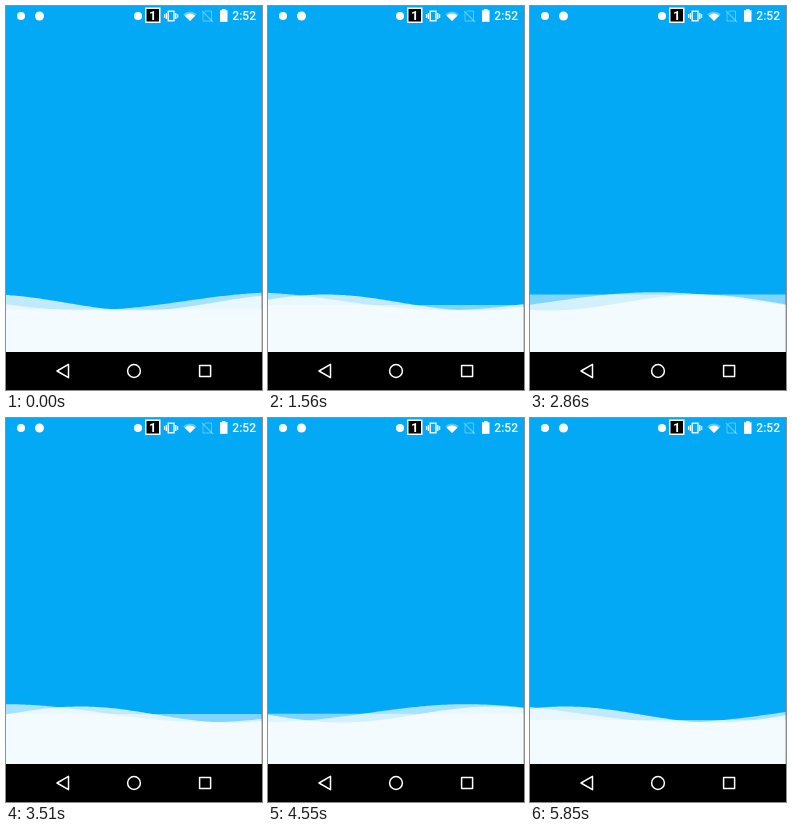
An HTML page with a canvas for the animation above (5.98 s loop, 256x384 px).

```html
<!DOCTYPE html>
<html>
<head>
<meta charset="utf-8">
<style>
  html, body { margin: 0; width: 100%; height: 100%; overflow: hidden; background: #000; }
  canvas { display: block; }
</style>
</head>
<body>
<canvas id="stage" width="256" height="384"></canvas>
<script>
const ctx = document.getElementById('stage').getContext('2d');
const W = 256, H = 384, NAV_TOP = 346;
const STEP = 130, LOOP = 5980, WAVE_PERIOD = 2070;
const START_PHASE = 20 * Math.PI / 180;
const SKY = '#03a9f5';

function shape(points, close = true) {
  ctx.beginPath();
  points.forEach(([x, y]) => ctx.lineTo(x, y));
  if (close) ctx.closePath();
}

function dot(x, y, r) {
  ctx.beginPath();
  ctx.arc(x, y, r, 0, 2 * Math.PI);
}

// Translucent white water below the curve y = height(x)
function water(alpha, height) {
  const right = 255.4;
  ctx.beginPath();
  ctx.moveTo(0, NAV_TOP);
  for (let x = 0; x < right; x += 2) ctx.lineTo(x, height(x));
  ctx.lineTo(right, height(right));
  ctx.lineTo(right, NAV_TOP);
  ctx.fillStyle = `rgba(255,255,255,${alpha})`;
  ctx.fill();
}

function wedge(x, y, r) {
  ctx.beginPath();
  ctx.moveTo(x, y);
  ctx.arc(x, y, r, -Math.PI * 0.75, -Math.PI * 0.25);
  ctx.closePath();
  ctx.fill();
}

function statusBar() {
  ctx.fillStyle = ctx.strokeStyle = '#fff';
  for (const [x, r] of [[15, 4], [33.5, 4.5], [132, 4]]) {
    dot(x, 10, r);
    ctx.fill();
  }

  // Boxed digit
  ctx.fillRect(139, 1.5, 15.5, 15.5);
  ctx.fillStyle = '#000';
  ctx.fillRect(140.5, 3, 12.5, 12.5);
  ctx.fillStyle = '#fff';
  ctx.font = 'bold 13px Roboto, sans-serif';
  ctx.textAlign = 'center';
  ctx.fillText('1', 146.7, 14);

  // Vibrate
  ctx.lineWidth = 1.3;
  ctx.strokeRect(162.2, 5.2, 5.8, 9.6);
  for (const side of [-1, 1]) {
    for (const [offset, half] of [[4.7, 3], [6.5, 1.8]]) {
      const x = 165.1 + side * offset;
      shape([[x, 10 - half], [x, 10 + half]], false);
      ctx.stroke();
    }
  }

  // Wi-Fi
  ctx.globalAlpha = 0.35;
  wedge(184, 15, 9.5);
  ctx.globalAlpha = 1;
  wedge(184, 15, 7.5);

  // Missing SIM
  ctx.globalAlpha = 0.35;
  shape([[199.5, 5], [205.5, 5], [205.5, 15], [197, 15], [197, 7.5]]);
  ctx.lineWidth = 1;
  ctx.stroke();
  shape([[196, 5], [207, 16]], false);
  ctx.lineWidth = 1.2;
  ctx.stroke();
  ctx.globalAlpha = 1;

  // Battery
  ctx.fillRect(214, 4.3, 7.5, 11.5);
  ctx.fillRect(216, 3, 3.5, 2);

  ctx.font = '500 12px Roboto, sans-serif';
  ctx.textAlign = 'right';
  ctx.fillText('2:52', 250, 14.3);
}

function navBar() {
  ctx.fillStyle = '#000';
  ctx.fillRect(0, NAV_TOP, W, H - NAV_TOP);
  ctx.strokeStyle = '#fff';
  ctx.lineWidth = 1.5;
  ctx.lineJoin = 'round';
  shape([[51, 365], [62.5, 358.3], [62.5, 371.7]]);
  ctx.stroke();
  dot(128, 365, 6.4);
  ctx.stroke();
  ctx.strokeRect(193.6, 359.6, 11, 11);
  ctx.lineJoin = 'miter';
}

function draw(now) {
  const time = Math.floor(now % LOOP / STEP) * STEP;
  const phase = START_PHASE + 2 * Math.PI * time / WAVE_PERIOD;
  const angle = (x, length) => 2 * Math.PI * x / length + phase;

  ctx.fillStyle = SKY;
  ctx.fillRect(0, 0, W, H);
  water(0.5, () => 296 + 8 * Math.cos(phase));
  water(0.65, x => 295.2 + 9 * Math.sin(angle(x, 400)));
  water(0.75, x => 296.5 - 8 * Math.cos(angle(x, 300)));
  statusBar();
  navBar();
  requestAnimationFrame(draw);
}
requestAnimationFrame(draw);
</script>
</body>
</html>
```
